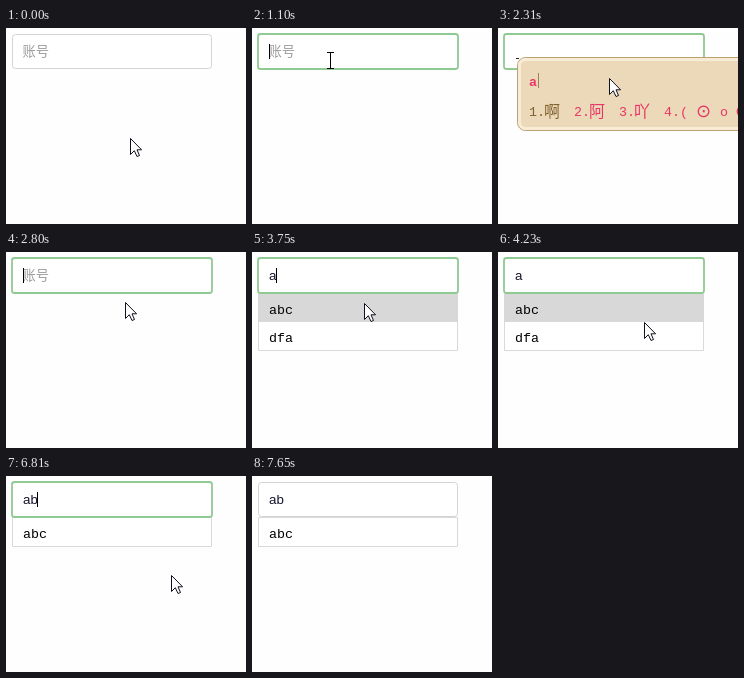
Write an HTML page with a canvas that moves like this. It is 240 by 196 pixels and loops after 7.75 s.

```html
<!DOCTYPE html>
<html lang="zh">
<head>
<meta charset="utf-8">
<title>Autocomplete input</title>
<style>
html, body { margin: 0; width: 240px; height: 196px; overflow: hidden; background: #fefefe; }
canvas { display: block; }
</style>
</head>
<body>
<canvas id="stage" width="240" height="196"></canvas>
<script>
const ctx = document.getElementById('stage').getContext('2d');
const LOOP = 7750, STEP = 120, BLINK = 520;
const SANS = '13.33px "Liberation Sans", Arial, sans-serif';
const MONO = '13.33px "Liberation Mono", monospace';
const CJK = '"Noto Sans CJK SC", "Noto Sans CJK", sans-serif';

const FOCUS = 730, COMPOSE = 1340, CANCEL = 2800, TYPE_A = 3500, OPEN = 3750;
const TYPE_B = 5950, FILTER = 6190, BLUR = 7650;
// The caret starts a new blink cycle at each of these
const caretResets = [FOCUS, COMPOSE, CANCEL, TYPE_A, 5770];

// Straight pointer strokes, each sampled every STEP
const strokes = [
  { at: 120, steps: 4, to: [81, 26] },
  { at: 1100, steps: 4, to: [68, 49] },
  { at: 1830, steps: 6, to: [119, 50] },
  { at: 3140, steps: 4, to: [104, 46] },
  { at: 3750, steps: 5, to: [146, 70] },
  { at: 4360, steps: 3, to: [220, 236] },
  { at: 4970, steps: 3, to: [159, 95] },
  { at: 5950, steps: 5, to: [165, 99] },
  { at: 6930, steps: 6, to: [220, 201] }
];

const within = (t, a, b) => t >= a && t < b;

function pointerAt(t) {
  let x = 124, y = 110;
  for (const { at, steps, to } of strokes) {
    if (t < at) break;
    const p = Math.min(1, (Math.floor((t - at) / STEP) + 1) / steps);
    x += (to[0] - x) * p;
    y += (to[1] - y) * p;
  }
  return [Math.round(x), Math.round(y)];
}

function caretLit(t) {
  const last = caretResets.filter(r => r <= t).pop();
  return within(t, FOCUS, BLUR) && Math.floor((t - last) / BLINK) % 2 === 0;
}

function rect(x, y, w, h, color) {
  ctx.fillStyle = color;
  ctx.fillRect(x, y, w, h);
}

function text(s, x, y, font, color) {
  ctx.font = font;
  ctx.fillStyle = color;
  ctx.fillText(s, x, y);
}

function box(x, y, w, h, r, stroke, fill, line = 1) {
  ctx.beginPath();
  ctx.roundRect(x, y, w, h, r);
  ctx.fillStyle = fill;
  ctx.fill();
  ctx.strokeStyle = stroke;
  ctx.lineWidth = line;
  ctx.stroke();
}

function drawInput(t, value, ime) {
  if (within(t, FOCUS, BLUR)) box(6, 6, 200, 35, 2.5, '#8fca92', '#fff', 1.8);
  else box(6.5, 6.5, 199, 34, 3, '#d4d4d4', '#fff');
  if (value) text(value, 17, 28, SANS, '#14142c');
  else if (!ime) text('账号', 16.5, 28, '300 13.33px ' + CJK, '#9c9c9c');
  if (ime) rect(18, 30, 3, 1, '#222');
  if (caretLit(t)) rect(ime ? 21 : 17 + 7 * value.length, 16, 1, 15, '#000');
}

function drawList(items, hover) {
  const h = items.length * 28;
  box(6.5, 41.5, 199, h + 1, 0, '#d9d9d9', '#fff');
  items.forEach((item, i) => {
    const y = 42 + i * 28;
    if (i === hover) rect(6, y, 200, 28, '#d8d8d8');
    text(item, 17, y + 20, MONO, '#000');
  });
}

function drawIme() {
  const pink = '#e83564', brown = '#80602c', circle = '18px "DejaVu Sans", sans-serif';
  box(19.5, 29.5, 250, 73, 8, '#bda071', '#ecd9ba');
  box(21.5, 31.5, 250, 69, 6, '#f8ecd6', '#ecd9ba', 3);
  text('a', 31, 58, 'bold ' + MONO, pink);
  rect(40, 45, 1, 15, '#a08058');
  ['啊', '阿', '吖'].forEach((word, i) => {
    const x = 31 + i * 45, color = i ? pink : brown;
    text(i + 1 + '.', x, 88, MONO, color);
    text(word, x + 15, 89, '16px ' + CJK, color);
  });
  text('4.(', 166, 88, MONO, pink);
  text('⊙', 198, 89, circle, pink);
  text('o', 222, 88, MONO, pink);
  text('⊙', 237, 89, circle, pink);
}

function drawPointer(x, y) {
  ctx.save();
  ctx.translate(x, y);
  if (y < 41) {
    rect(-3, -8, 7, 1, '#000');
    rect(0, -8, 1, 16, '#000');
    rect(-3, 8, 7, 1, '#000');
  } else {
    const arrow = new Path2D('M.5 .5V16.5L4.3 12.7 7 18.5 9.5 17.5 7 11.8H11.6Z');
    ctx.fillStyle = '#fff';
    ctx.fill(arrow);
    ctx.strokeStyle = '#10101c';
    ctx.lineWidth = 1;
    ctx.stroke(arrow);
  }
  ctx.restore();
}

function draw(t) {
  const [x, y] = pointerAt(t);
  const ime = within(t, COMPOSE, CANCEL);
  const value = t < TYPE_A ? '' : t < TYPE_B ? 'a' : 'ab';
  rect(0, 0, 240, 196, '#fefefe');
  if (t >= OPEN) drawList(t < FILTER ? ['abc', 'dfa'] : ['abc'], Math.ceil((y - 42) / 28) - 1);
  drawInput(t, value, ime);
  if (ime) drawIme();
  drawPointer(x, y);
}

const began = performance.now();
function tick() {
  draw((performance.now() - began) % LOOP);
  requestAnimationFrame(tick);
}
tick();
</script>
</body>
</html>
```
